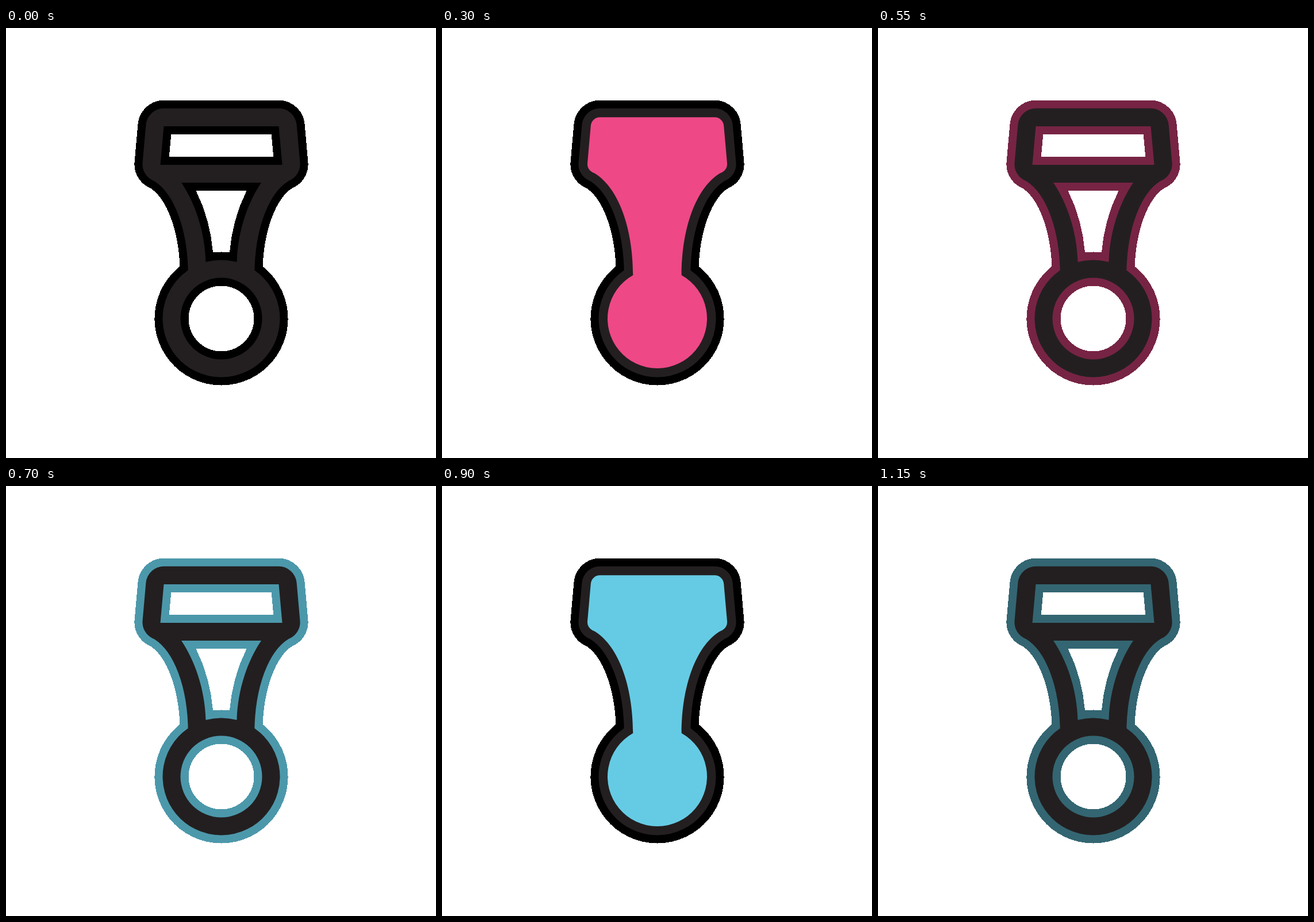
Animation of 748x748 px, one loop 1200 ms. Source, as an HTML page:

```html
<!DOCTYPE html>
<html lang="en">
<head>
<meta charset="utf-8">
<title>Buckle</title>
<style>
  html, body { margin: 0; width: 100%; height: 100%; overflow: hidden; background: #fff; }
  svg { display: block; width: 100%; height: 100%; }
</style>
</head>
<body>
<svg viewBox="0 0 748 748">
  <defs>
    <path id="core" stroke-linejoin="round" d="M275 155.2H474A16 16 0 0 1 490.2 170L496 235.5
      A15.5 15.5 0 0 1 487.4 250.9L483 253C443 278 417 345 416.7 430
      A86.5 86.5 0 1 1 332.3 430C332 345 306 278 266 253L261.6 250.9
      A15.5 15.5 0 0 1 253 235.5L258.8 170A16 16 0 0 1 275 155.2Z"/>
  </defs>
  <use id="rim" href="#core" stroke-width="59" shape-rendering="crispEdges"/>
  <use href="#core" fill="#231f20" stroke="#231f20" stroke-width="31"/>
  <g id="bevels">
    <path d="M274.5 171H474.5L480.5 238H268.5Z"/>
    <path d="M305 269H444C421 303 403 353 401.5 407.1A102 102 0 0 0 347.5 407.1C346 353 328 303 305 269Z"/>
    <circle cx="374.5" cy="505.5" r="71"/>
  </g>
  <g id="holes" shape-rendering="crispEdges">
    <path d="M287.3 185H461.7L465.2 224H283.8Z"/>
    <path d="M330.5 283H418.5C402 317 392 352 389 390.4A116 116 0 0 0 360 390.4C357 352 347 317 330.5 283Z"/>
    <circle cx="374.5" cy="505.5" r="57"/>
  </g>
  <use id="glow" href="#core"/>
</svg>
<script>
  const [rim, bevels, holes, glow] = ['rim', 'bevels', 'holes', 'glow'].map(id => document.getElementById(id));
  const STEP = 50, HALF = 12;
  const PINK = [238, 72, 135], CYAN = [101, 203, 228];
  const LEVELS = [0, 0.5, 0.75, 1];
  const rgb = (c, k = 1) => `rgb(${c.map(v => Math.round(v * k)).join()})`;

  function draw(ms) {
    const step = Math.floor(ms / STEP) % (2 * HALF);
    const hue = step < HALF ? PINK : CYAN;
    const p = step % HALF;
    // The rim pulses twice per colour; the fill pulses once, in the middle.
    const edge = rgb(hue, LEVELS[3 - Math.abs(3 - p % 6)]);
    const fill = LEVELS[Math.max(0, 3 - Math.abs(6 - p))];

    rim.setAttribute('fill', edge);
    rim.setAttribute('stroke', edge);
    bevels.setAttribute('fill', edge);
    holes.setAttribute('fill', fill ? rgb(hue) : '#fff');
    glow.setAttribute('fill', rgb(hue));
    glow.setAttribute('opacity', fill);
  }

  const start = performance.now();
  function tick() {
    draw(performance.now() - start);
    requestAnimationFrame(tick);
  }
  tick();
</script>
</body>
</html>
```
